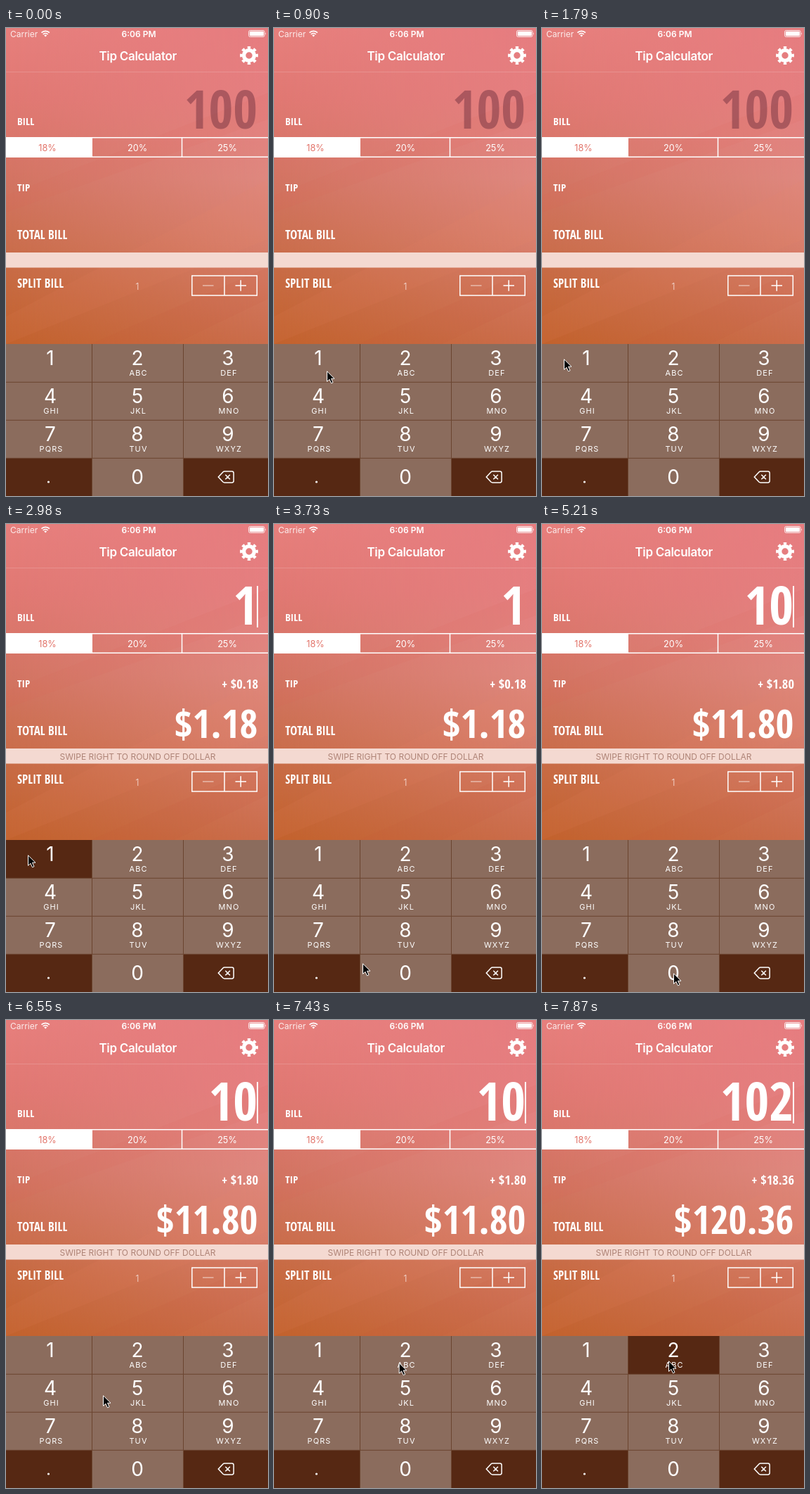
Write an HTML page that moves like this. It is 373 px wide and 665 px high and loops after 8 s.

```html
<!DOCTYPE html>
<html lang="en">
<head>
<meta charset="utf-8">
<title>Tip Calculator</title>
<style>
html, body { margin: 0; height: 100%; overflow: hidden; }
svg { display: block; width: 373px; height: 665px; }
text { font-family: Inter, Roboto, sans-serif; fill: #fff; }
.narrow {
  font-family: "Open Sans Condensed", "Roboto Condensed", "Open Sans", "Noto Sans", sans-serif;
  font-stretch: 75%;
}
.mid { text-anchor: middle; }
.end { text-anchor: end; }
.line { fill: none; stroke: #fff; stroke-width: 1.5; }
</style>
</head>
<body>
<svg viewBox="0 0 373 665">
  <defs>
    <linearGradient id="right" x2="0" y2="1">
      <stop stop-color="#e77d80"/><stop offset=".15" stop-color="#e57f80"/>
      <stop offset=".32" stop-color="#df887f"/><stop offset=".46" stop-color="#d97f6d"/>
      <stop offset=".67" stop-color="#cb6d4c"/>
    </linearGradient>
    <linearGradient id="left" x2="0" y2="1">
      <stop stop-color="#e67f7c"/><stop offset=".15" stop-color="#e07872"/>
      <stop offset=".34" stop-color="#d17360"/><stop offset=".5" stop-color="#c86c47"/>
      <stop offset=".67" stop-color="#c2622d"/>
    </linearGradient>
    <linearGradient id="fade"><stop stop-color="#fff"/><stop offset="1" stop-color="#000"/></linearGradient>
    <mask id="leftward"><rect width="373" height="665" fill="url(#fade)"/></mask>
  </defs>

  <rect width="373" height="665" fill="url(#right)"/>
  <rect width="373" height="665" fill="url(#left)" mask="url(#leftward)"/>
  <path d="M0 238L373 92V130L0 262z" fill="#d4584e" opacity=".08"/>
  <path d="M0 410L373 215V300L0 449z" fill="#e08a60" opacity=".09"/>
  <path d="M120 449L373 340V385L240 449z" fill="#b8503a" opacity=".08"/>

  <g id="status">
    <text x="6" y="12.5" font-size="12" opacity=".85">Carrier</text>
    <g fill="none" stroke="#fff" stroke-width="1.7">
      <path d="M50.5 6.6a8.2 8.2 0 0 1 11.4 0M52.7 9a5 5 0 0 1 7 0"/>
      <path d="M54.3 10.4L56.2 12.6 58.1 10.4a2.7 2.7 0 0 0-3.8 0z" fill="#fff" stroke="none"/>
    </g>
    <text class="mid" x="189" y="12.5" font-size="12" font-weight="600">6:06 PM</text>
    <rect x="345.5" y="3.5" width="22.5" height="9" rx="2" fill="none" stroke="#fff" stroke-width=".8"/>
    <rect x="346.8" y="4.8" width="20" height="6.4" rx="1" fill="#fff"/>
    <path d="M369 6.2q1.5 1.8 0 3.6z" fill="#fff"/>
  </g>
  <text class="mid" x="187.7" y="46" font-size="17" font-weight="600" letter-spacing="-.3">Tip Calculator</text>
  <g transform="translate(346 39)" fill="none" stroke="#fff">
    <circle r="7.4" stroke-width="5.4"/>
    <circle r="11.1" stroke-width="3.6" pathLength="16" stroke-dasharray="1 1" stroke-dashoffset=".5"/>
  </g>
  <path d="M0 62.5H373" stroke="#fff" opacity=".16"/>

  <g class="labels">
    <text class="narrow" x="16" y="137.5" font-size="15" font-weight="300">BILL</text>
    <text class="narrow" x="16" y="231.5" font-size="15" font-weight="300">TIP</text>
    <text class="narrow" x="16" y="299.5" font-size="17" font-weight="700">TOTAL BILL</text>
    <text class="narrow" x="16" y="368.5" font-size="17">SPLIT BILL</text>
  </g>

  <path class="line" d="M0 155.8H373M0 183.2H373M250.5 155V184"/>
  <rect y="155" width="123" height="29" fill="#fff"/>
  <g font-size="12.7">
    <text class="mid" x="59" y="174.5" style="fill:#e2746a">18%</text>
    <text class="mid" x="187" y="174.5">20%</text>
    <text class="mid" x="315" y="174.5">25%</text>
  </g>

  <rect y="319" width="373" height="21.5" fill="#f4d9d1"/>
  <text id="hint" class="mid" x="187.5" y="334.7" font-size="12" style="fill:#ae8376">SWIPE RIGHT TO ROUND OFF DOLLAR</text>

  <text class="mid" x="187" y="371.5" font-size="13.5" font-weight="300" opacity=".75">1</text>
  <rect class="line" x="264.8" y="352" width="92.5" height="28"/>
  <path class="line" d="M311 352V380M326.5 366H342M334.2 358.3V373.8"/>
  <path class="line" d="M280 366H295.5" opacity=".5"/>

  <text id="bill" class="narrow end" x="358" y="142.5" font-size="75"></text>
  <rect id="caret" x="357" y="88" width="2" height="59" fill="#fff"/>
  <text id="tip" class="narrow end" x="359" y="233.5" font-size="18.5"></text>
  <text id="total" class="narrow end" x="358.5" y="303.5" font-size="56"></text>

  <g id="keys"></g>
  <path class="line" d="M302.3 638l6.6-7q.9-.9 2.2-.9h10.6q2.4 0 2.4 2.4v11q0 2.4-2.4 2.4h-10.6q-1.3 0-2.2-.9zM312.3 634.7l6.6 6.6M318.9 634.7l-6.6 6.6"/>
  <path id="pointer" d="M.5.8V15.4L3.9 12.2 6.5 17.8 9 16.7 6.5 11.2H11z" fill="#000" stroke="#fff"/>
</svg>

<script>
const STEP = 148.5, LOOP = 8000, RATE = 0.18;
const $ = id => document.getElementById(id);

// All schedules are [step, ...values].
const typed = [[0, ''], [20, '1'], [34, '10'], [53, '102']];
const pressed = [[0, null], [20, '1'], [21, null], [34, '0'], [35, null], [53, '2']];
const caretAlpha = [
  [0, 0], [1, .5], [2, 1], [4, .5], [5, 0], [7, .5], [8, 1], [11, .5], [12, 0],
  [14, .5], [15, 1], [18, .5], [19, 0], [20, 1], [24, .5], [25, 0], [27, .5], [28, 1],
  [31, .5], [32, 0], [34, 1], [38, .5], [39, 0], [42, 1], [45, .5], [46, 0],
  [48, .5], [49, 1], [52, 0], [53, 1]
];
const route = [
  [6, 75, 487], [9, 31, 470], [21, 31, 470], [25, 126, 624], [27, 176, 641], [29, 187, 638],
  [36, 187, 638], [40, 121, 538], [43, 121, 538], [44, 138, 533], [51, 180, 484], [54, 180, 484]
];

const keys = {};
const columns = [[0, 122.5, 63], [122.5, 130, 187], [252.5, 120.5, 316]];
const letters = ['', 'ABC', 'DEF', 'GHI', 'JKL', 'MNO', 'PQRS', 'TUV', 'WXYZ'];

function buildKeys() {
  let markup = '';
  [...'123456789.0<'].forEach((key, i) => {
    const [x, width, center] = columns[i % 3];
    const top = 449 + 54 * Math.floor(i / 3);
    markup += `<rect data-key="${key === '<' ? 'back' : key}" x="${x}" y="${top}" width="${width}" height="54"/>`;
    if (key === '.') markup += `<circle cx="60.5" cy="645" r="1.6" fill="#fff"/>`;
    else if (key !== '<') markup += `<text class="mid" x="${center}" y="${top + (i > 8 ? 37 : 30)}" font-size="28">${key}</text>`;
    if (letters[i]) markup += `<text class="mid" x="${center + 1.5}" y="${top + 45}" font-size="11" letter-spacing="1.1">${letters[i]}</text>`;
  });
  markup += '<path d="M0 503.3H373M0 557.3H373M0 611.3H373M122.5 449V665M252.5 449V665" stroke="#6b442f"/>';
  $('keys').innerHTML = markup;
  $('keys').querySelectorAll('rect').forEach(r => keys[r.dataset.key] = r);
}

const valueAt = (schedule, n) => schedule.findLast(entry => entry[0] <= n)[1];

function pointerAt(n) {
  const i = route.findLastIndex(p => p[0] <= n);
  if (i < 0) return null;
  const [start, x, y] = route[i], [end, x2, y2] = route[i + 1] || route[i];
  const p = end > start ? (n - start) / (end - start) : 0;
  const eased = p * p * (3 - 2 * p);
  return [x + (x2 - x) * eased, y + (y2 - y) * eased];
}

function draw(n) {
  const bill = valueAt(typed, n), down = valueAt(pressed, n);
  const tip = bill * RATE;
  $('bill').textContent = bill || '100';
  $('bill').style.fill = bill ? '#fff' : 'rgba(92,36,52,.42)';
  $('tip').textContent = bill && `+ $${tip.toFixed(2)}`;
  $('total').textContent = bill && `$${(+bill + tip).toFixed(2)}`;
  $('hint').style.opacity = bill ? 1 : 0;
  $('caret').style.opacity = valueAt(caretAlpha, n);
  for (const key in keys) {
    keys[key].setAttribute('fill', key === down || key === '.' || key === 'back' ? '#562813' : '#8b6c5d');
  }
  const at = pointerAt(n);
  $('pointer').style.display = at ? '' : 'none';
  if (at) $('pointer').setAttribute('transform', `translate(${at})`);
}

function tick() {
  draw(Math.floor((performance.now() % LOOP + 5) / STEP));
  requestAnimationFrame(tick);
}

buildKeys();
tick();
</script>
</body>
</html>
```
